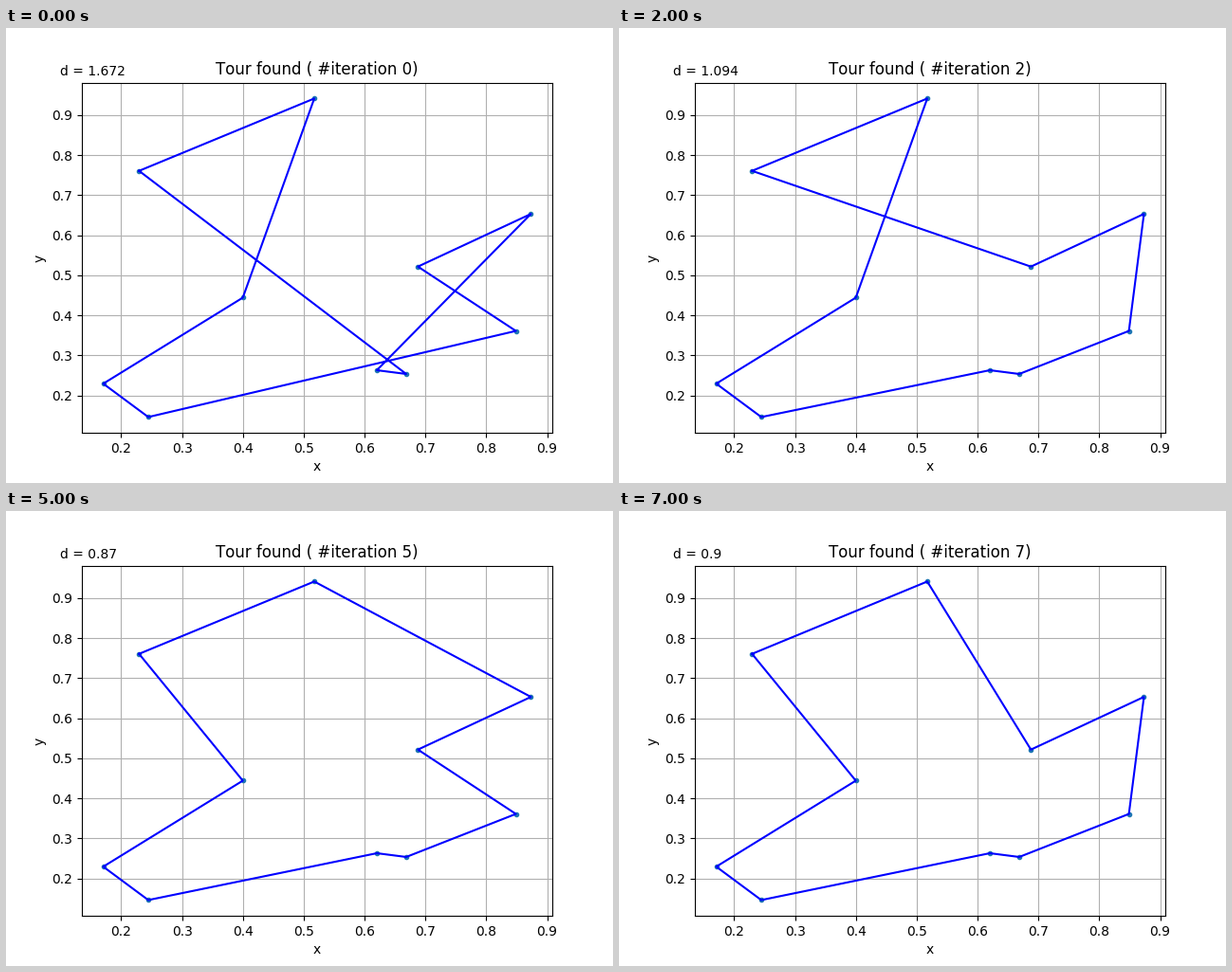
A matplotlib script for the animation above (8 s loop, 640 by 480 pixels).

```python
import numpy as np
import matplotlib.pyplot as plt
from matplotlib.animation import FuncAnimation

plt.rcParams["text.kerning_factor"] = 6  # whole-pixel glyph spacing

CITIES = {
    "A": (0.2294, 0.7609), "B": (0.5173, 0.9416), "C": (0.3999, 0.4441),
    "D": (0.1706, 0.2293), "E": (0.2446, 0.1459), "F": (0.8486, 0.3610),
    "G": (0.6876, 0.5217), "H": (0.8733, 0.6533), "I": (0.6201, 0.2629),
    "J": (0.6684, 0.2535),
}

# Tour of each iteration and its cost
TOURS = [
    ("ABCDEFGHIJ", 1.672),
    ("ABCDEFJIGH", 1.495),
    ("ABCDEIJFHG", 1.094),
    ("ABCDEIJFGH", 1.219),
    ("ACDEIJFGHB", 0.87),
    ("ACDEIJFGHB", 0.87),
    ("ACDEIJFGHB", 0.87),
    ("ACDEIJFHGB", 0.9),
]

fig, ax = plt.subplots(figsize=(6.4, 4.8), dpi=100)
ax.set_xlim(0.13547, 0.90842)
ax.set_ylim(0.10616, 0.98137)
ax.set_xlabel("x")
ax.set_ylabel("y")
ax.grid(True)

ax.plot(*np.array(list(CITIES.values())).T, ".", color="C0")
path, = ax.plot([], [], color="blue", lw=1.5)
title = ax.set_title("")
cost_text = ax.text(0.1, 1.0, "")


def update(i):
    tour, cost = TOURS[i]
    points = np.array([CITIES[c] for c in tour + tour[0]])
    path.set_data(points[:, 0], points[:, 1])
    title.set_text(f"Tour found ( #iteration {i})")
    cost_text.set_text(f"d = {cost}")
    return path, title, cost_text


anim = FuncAnimation(fig, update, frames=len(TOURS), interval=1000,
                     repeat=True, repeat_delay=0, blit=False)
plt.show()
```
